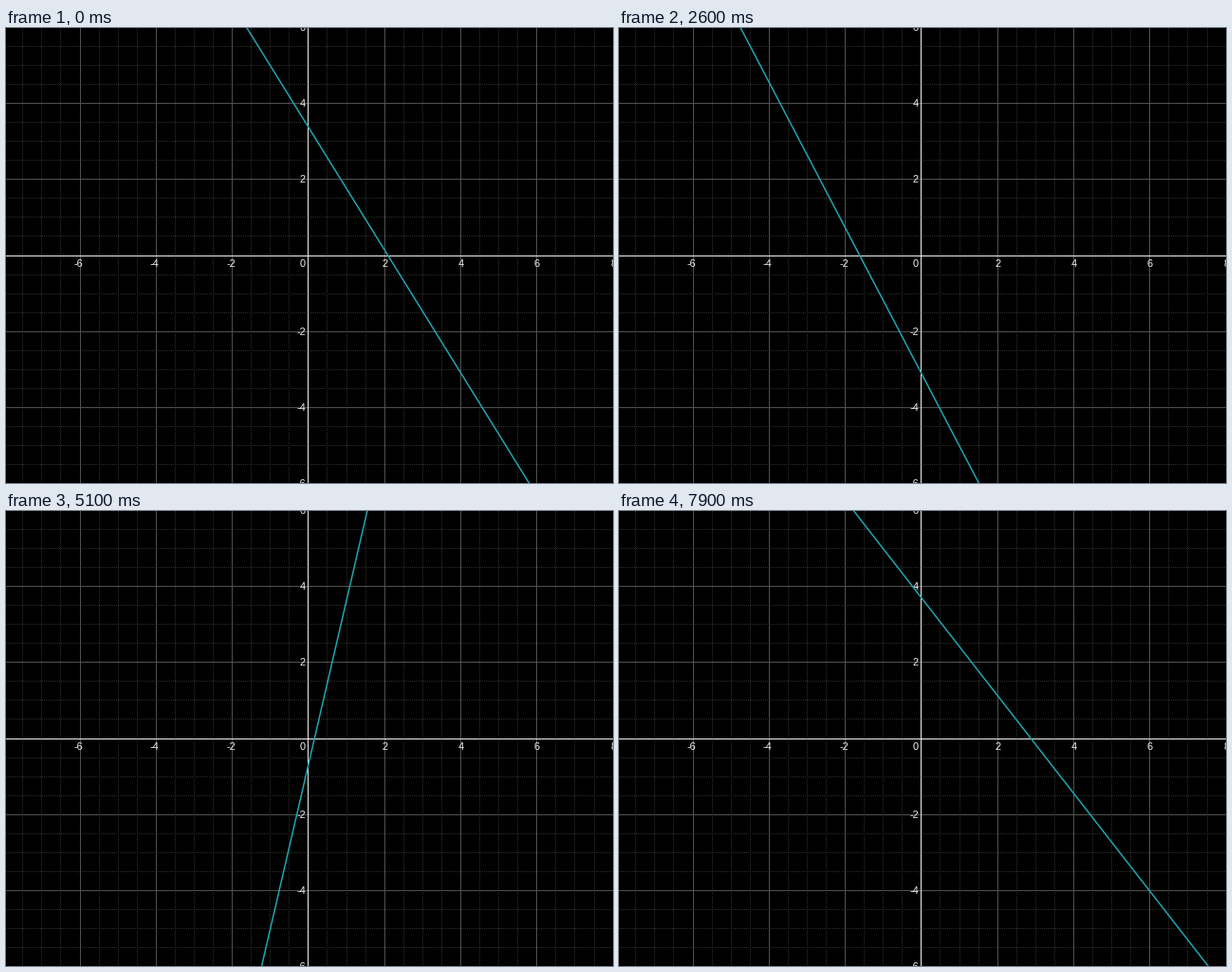
Recreate the animation shown at these times as a matplotlib script. Size 640 by 480 pixels, loop 8000 ms.

```python
import numpy as np
import matplotlib.pyplot as plt
from matplotlib.animation import FuncAnimation

W, H, DPI = 640, 480, 100
FRAMES, STEP_MS = 80, 100
CX, CY, UNIT = 318.9, 240, 40.15

AXIS = "#f0f0f0"
MAJOR = "#50504c"
MINOR = "#2e2e2c"
TEAL = "#22a6b0"

PX = 72 / DPI  # one pixel in points

fig = plt.figure(figsize=(W / DPI, H / DPI), dpi=DPI, facecolor="black")
ax = fig.add_axes([0, 0, 1, 1])
ax.set_xlim(0, W)
ax.set_ylim(H, 0)
ax.axis("off")


def col(x):
    return int(np.floor(CX + UNIT * x))


def row(y):
    return int(np.floor(CY - UNIT * y))


def rule(xs, ys, color, z, dashes=None):
    line, = ax.plot(xs, ys, color=color, lw=PX, zorder=z, snap=False,
                    solid_capstyle="butt", dash_capstyle="butt")
    if dashes:
        line.set_dashes(dashes)


def vline(x, *style):
    rule([col(x) + 0.5] * 2, [0, H], *style)


def hline(y, *style):
    rule([0, W], [row(y) + 0.5] * 2, *style)


def label(x, y, value, ha):
    ax.text(x, y, str(value), color=AXIS, size=11 * PX, family="Liberation Sans",
            ha=ha, va="baseline", zorder=4)


# Grid every half unit, stronger on even numbers, with the axes at zero
for k in range(-15, 16):
    v = k / 2
    if k == 0:
        style = (AXIS, 3)
    elif k % 4 == 0:
        style = (MAJOR, 2)
    else:
        style = (MINOR, 1, (1, 1))
    vline(v, *style)
    if abs(v) < 6:
        hline(v, *style)

for v in (-6, -4, -2, 2, 4, 6, 8):
    label(CX + UNIT * v - (1.5 if v < 0 else 0), CY + 11.5, v, "center")
for v in (-6, -4, -2, 2, 4, 6):
    label(CX - 3, row(v) + 4, v, "right")
label(CX - 3, CY + 11.5, 0, "right")

graph, = ax.plot([], [], color=TEAL, lw=1.5 * PX, zorder=5)


def triangle(u):
    """Triangle wave of period 1 running like a cosine between 5 and -5."""
    return 20 * abs(u % 1 - 0.5) - 5


def draw(i):
    u = 0.0807 + 0.01245 * i
    slope = triangle(u + 0.25)
    offset = triangle(u + 0.0024)  # runs slightly ahead of the slope
    x = np.array([-9.0, 9.0])
    y = slope * x + offset
    graph.set_data(CX + 0.5 + UNIT * x, CY - 0.5 - UNIT * y)
    return graph,


anim = FuncAnimation(fig, draw, frames=FRAMES, interval=STEP_MS,
                     repeat=True, repeat_delay=0, blit=False)
plt.show()
```
